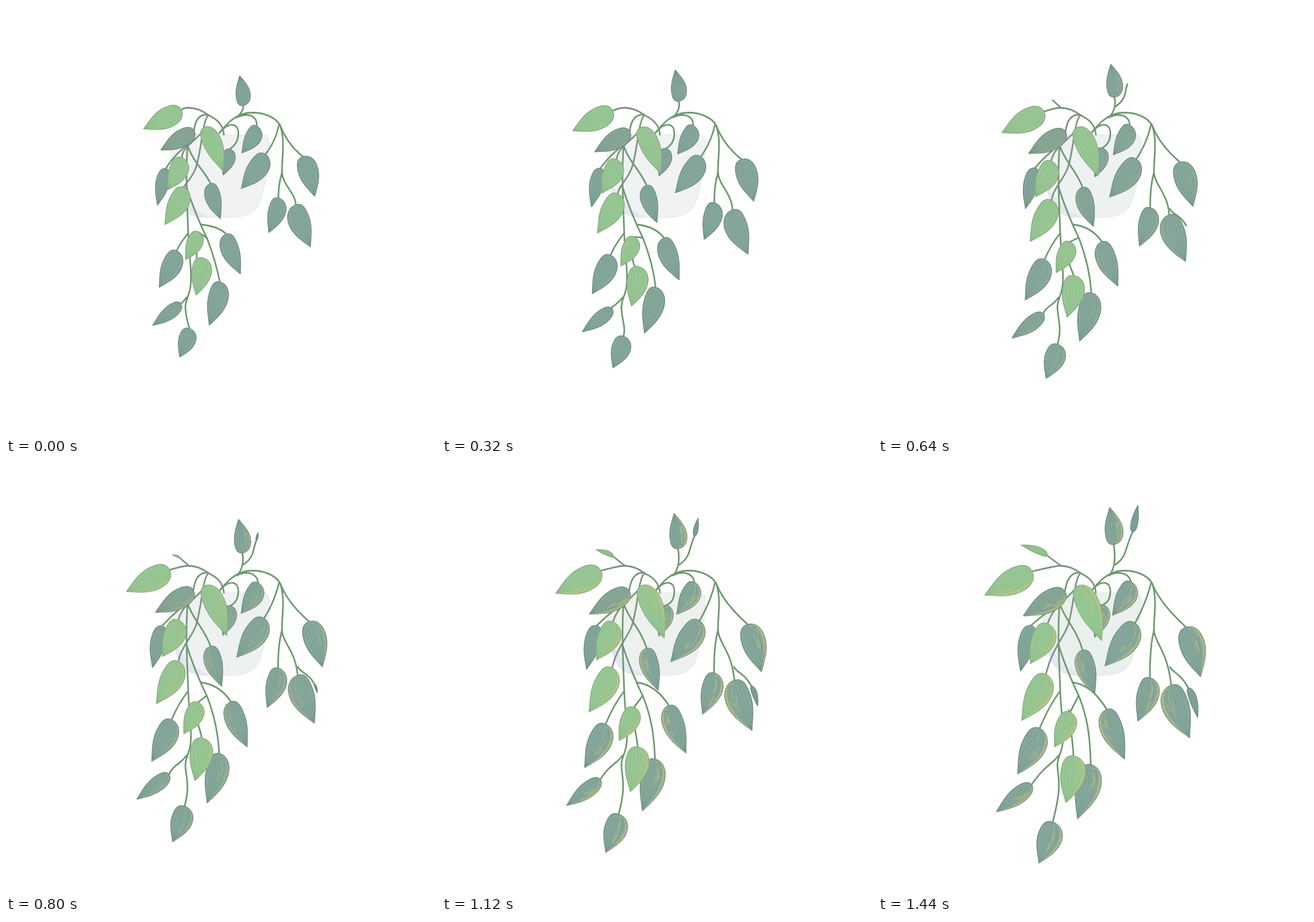
Animation, 748 px wide and 748 px high, one loop 1.6 s. Source, as an HTML page:

```html
<!DOCTYPE html>
<html lang="en">
<head>
<meta charset="utf-8">
<title>Growing plant</title>
<style>
  html, body { margin: 0; width: 100%; height: 100%; overflow: hidden; background: #fff; }
  svg { display: block; width: 100vw; height: 100vh; }
</style>
</head>
<body>
<svg id="stage" viewBox="0 0 748 748" fill="none" stroke-linecap="round" stroke-linejoin="round"></svg>
<script>
const STEP = 160, POSES = 10, LAST = POSES - 1, SPROUT = 4;
const TEAL = { fill: '#86a79b', vein: '#6c9186', edge: '#738f82' };
const SAGE = { fill: '#88a696', vein: '#729182', edge: '#748e80' };
const LIME = { fill: '#97c694', vein: '#86b87f', edge: '#88ae84' };
const GREEN = '#6d986e', GRAY = '#7c917f', SUN = '#c8c577';
const clamp = v => Math.min(1, Math.max(0, v));
const mix = (a, b, f) => a + (b - a) * f;
const leaves = [];

// A leaf hangs at the end of its stem: its base drifts from `base` to `end`
// while the blade lengthens from `young` to its full `reach`.
function leaf(tone, stem, base, end, reach, options) {
  leaves.push({
    tone, stem, base, end, reach,
    bark: GREEN, width: .24, lean: -.05, young: .8, start: 0, ...options
  });
}

function sprout(tone, stem, base, end, reach, options) {
  leaf(tone, stem, base, end, reach, { width: .12, lean: 0, young: 0, start: SPROUT, ...options });
}

// Listed from back to front
leaf(TEAL, 'M320 238Q293 258', [278, 283], [266, 281], [-18, 79], { width: .18, lean: 0 });
leaf(LIME, 'M342 218C330 235 306 245', [306, 264], [295, 278], [-30, 69], { width: .27, lean: -.06, bark: GRAY });
leaf(SAGE, 'M352 189Q330 187', [327, 217], [325, 222], [-72, 42], { width: .22, lean: -.01 });
leaf(TEAL, 'M374 218C388 201 406 203 404 225Q403 240', [389, 249], [391, 245], [-14, 56]);
leaf(LIME, '', [345, 211], [348, 212], [41, 95], { width: .19, lean: -.03 });
leaf(TEAL, 'M402 194Q416 178', [412, 173], [410, 140], [-7, -64], { lean: .05 });
leaf(LIME, 'M318 177Q308 177', [305, 181], [268, 187], [-82, 41], { lean: -.01, bark: GRAY });
leaf(TEAL, 'M403 193C425 184 438 194', [436, 209], [440, 205], [-32, 58], { width: .26, lean: -.08 });
leaf(TEAL, 'M475 206Q468 238', [451, 258], [447, 277], [-52, 74]);
leaf(TEAL, 'M477 208Q490 242', [517, 262], [536, 284], [25, 86], { lean: -.02 });
leaf(TEAL, 'M480 290Q473 315', [474, 334], [473, 372], [-21, 75], { lean: -.06 });
leaf(TEAL, 'M480 290C482 312 504 326', [504, 346], [510, 385], [32, 91], { lean: .05 });
leaf(TEAL, 'M316 243C326 272 345 286', [356, 309], [356, 324], [21, 76], { width: .21, lean: .04 });
leaf(LIME, 'M331 279C326 298 304 318', [310, 316], [292, 366], [-42, 80], { bark: GRAY });
leaf(LIME, 'M349 403L', [334, 393], [334, 432], [-27, 60], { width: .26 });
leaf(TEAL, 'M339 380Q372 384', [383, 397], [398, 427], [31, 86], { width: .21, lean: .04 });
leaf(TEAL, 'M317 395Q299 418', [297, 426], [281, 460], [-38, 79]);
leaf(TEAL, 'M350 405C362 436 369 465', [372, 480], [370, 523], [-23, 94], { width: .22 });
leaf(LIME, 'M332 428C330 450 338 460', [341, 438], [340, 508], [-13, 81], { width: .26 });
leaf(TEAL, 'M314 507C304 522 290 524', [304, 518], [267, 558], [-61, 47], { width: .18, lean: -.01 });
leaf(TEAL, 'M312 525C314 551 320 560', [319, 561], [304, 623], [-24, 71], { width: .28, young: .7 });
sprout(TEAL, 'M413 175C434 160 428 150', [434, 136], [443, 118], [9, -46]);
sprout(LIME, 'M318 177L', [304, 164], [294, 159], [-45, -18], { lean: .05, bark: GRAY });
sprout(TEAL, 'M508 353C511 362 527 364', [536, 382], [540, 390], [16, 51], { lean: -.04 });

const trunks = [
  ['M379 224C378 207 366 196 352 190Q338 178 318 177M351 191C341 205 341 245 331 279', GRAY],
  ['M371 221C384 205 397 190 420 186C447 183 470 194 477 208C486 235 480 260 480 290', GREEN],
  ['M316 241C312 290 315 340 317 395C318 430 325 470 320 493C317 507 312 512 312 525', GREEN],
  ['M313 312C325 350 336 376 350 405', GREEN]
];

function randomFrom(seed) {
  return () => {
    seed = (seed * 16807) % 2147483647;
    return seed / 2147483647;
  };
}

const path = (d, stroke, width, extra = '') =>
  `<path d="${d}" stroke="${stroke}" stroke-width="${width}" ${extra}/>`;

function poseOf({ base, end, reach, young, start }, k) {
  const grown = clamp((k - start) / (LAST - start));
  const size = young ? mix(young, 1, grown) : grown ** .8;
  return {
    root: base.map((v, i) => mix(v, end[i], grown)),
    blade: reach.map(v => v * size)
  };
}

function drawStem({ stem, bark, start }, { root }, k) {
  return stem && k >= start ? path(`${stem} ${root.join(' ')}`, bark, 2.8) : '';
}

function drawLeaf({ tone, width: w, lean: b }, { root: [x, y], blade: [dx, dy] }, light, seed) {
  if (Math.hypot(dx, dy) < 5) return '';
  // u runs from base to tip, v across the blade
  const p = (u, v) => `${(x + dx * u - dy * v).toFixed(1)} ${(y + dy * u + dx * v).toFixed(1)} `;
  const curve = (...pts) => 'C' + pts.map(q => p(...q)).join('');
  const side = q => curve([0, .62 * q], [.12, b + q], [.36, b + q]) +
    curve([.62, b + q], [.84, .5 * b + .34 * q], [1, 0]);
  const back = q => curve([.84, .5 * b + .34 * q], [.62, b + q], [.36, b + q]) +
    curve([.12, b + q], [0, .62 * q], [0, 0]);
  const line = v => 'M' + p(.06, v * .5) + curve([.2, b + v], [.6, b + v * .9], [.96, 0]);
  const outline = 'M' + p(0, 0) + side(w) + back(-w) + 'Z';

  let art = path(outline, tone.edge, 1.6, `fill="${tone.fill}"`);
  for (let v = -.75; v < .8; v += .37)
    art += path(line(v * w), tone.vein, .9, 'opacity=".6"');

  if (light && b) {
    const random = randomFrom(seed), q = Math.sign(b) * w;
    const rim = 'M' + p(0, 0) + side(q * .97) + back(q * .78) + 'Z';
    art += `<g opacity="${light}"><path d="${rim}" fill="${SUN}" opacity=".6"/>`;
    for (let i = 0; i < 5; i++) {
      const dash = `0 ${5 + random() * 35} ${6 + random() * 16} 200`;
      art += path(line(q * (.2 + .6 * random())), SUN, 2, `stroke-dasharray="${dash}" opacity=".4"`);
    }
    art += '</g>';
  }
  return art;
}

function drawPot(k) {
  const age = clamp((k - 2) / 7);
  const fill = `rgb(${mix(240, 234, age)},${mix(242, 240, age)},${mix(244, 237, age)})`;
  const shape = 'M296 224H447Q458 224 458 238C457 280 452 306 444 334C436 360 420 368 385 368' +
    'H345C310 367 298 345 293 310C288 280 286 250 286 232Q286 224 296 224Z';
  const shadow = 'M290 290C297 325 318 350 353 367H345C310 367 298 345 293 310Z';
  return `<path d="${shape}" fill="${fill}"/><path d="${shadow}" fill="#e3e7f1"/>` +
    path(shape, '#d5dbdd', .8, 'stroke-dasharray="3 2"');
}

const stage = document.getElementById('stage');
let shown = -1;

function draw(time) {
  const k = Math.floor(time / STEP) % POSES;
  if (k === shown) return;
  shown = k;
  const poses = leaves.map(l => poseOf(l, k));
  const light = clamp((k - 3) / 4);
  stage.innerHTML = drawPot(k) +
    trunks.map(([d, color]) => path(d, color, 2.8)).join('') +
    leaves.map((l, i) => drawStem(l, poses[i], k)).join('') +
    leaves.map((l, i) => drawLeaf(l, poses[i], l.start ? 0 : light, 97 * i + 11)).join('');
}

const begin = performance.now();
function tick() {
  draw(performance.now() - begin);
  requestAnimationFrame(tick);
}
tick();
</script>
</body>
</html>
```
